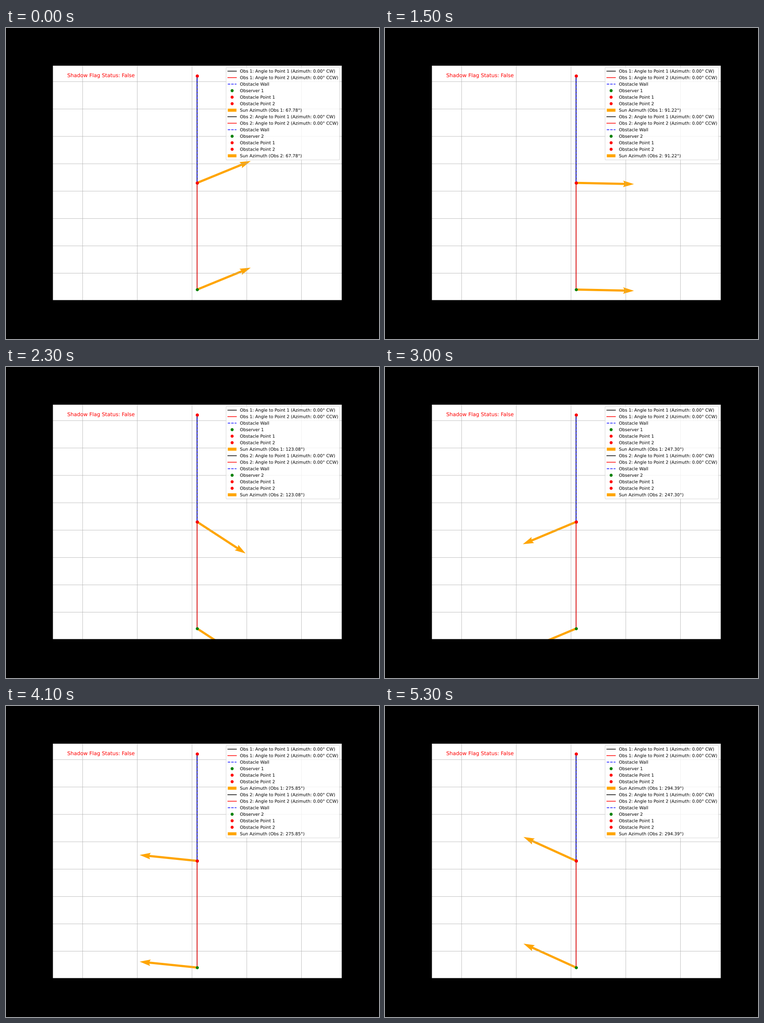
A matplotlib script that plays this animation: 820 px wide and 683 px high, repeating every 5.4 s.

```python
import math

import matplotlib.pyplot as plt
from matplotlib.animation import FuncAnimation
from matplotlib.patches import FancyBboxPatch, Rectangle
from matplotlib.patheffects import Normal

WIDTH, HEIGHT = 820, 683
FRAMES, INTERVAL = 54, 100

# All positions are in a virtual canvas of 1200 x 1000 with y pointing down
CANVAS_W, CANVAS_H = 1200, 1000
DPI = WIDTH / 12
LEFT, RIGHT, TOP, BOTTOM = 150.5, 1080.5, 120.5, 875.5
GRID_X = [246.5 + 176 * i for i in range(5)]
GRID_Y = [172.5 + 88 * i for i in range(8)]

# The wall runs from POINT_1 to POINT_2; one observer at its foot, one below
POINT_1, POINT_2 = (615, 154), (615, 498)
OBSERVERS = [POINT_2, (615, 841)]

# Legend metrics
EM = 1000 / 72
ROW = 14 + EM / 2
BOX = (708.1, 126.9, 365, 297.4)
HANDLE_X, HANDLE_W, HANDLE_H = 713.6, 2 * EM, 0.7 * EM
LABEL_X, BASELINE = 752.5, 143.5

# Sun model, in degrees; one frame is a quarter of an hour
LATITUDE = math.radians(28.455)
DECLINATION, DECLINATION_DRIFT = 21.5417, -0.00144
NOON, HOUR_STEP = 25.8555, 3.75


def sun_azimuth(frame):
    """Azimuth clockwise from north, in degrees."""
    since_noon = frame - NOON
    hour = math.radians(HOUR_STEP * since_noon)
    decl = math.radians(DECLINATION + DECLINATION_DRIFT * since_noon)
    south = math.cos(hour) * math.sin(LATITUDE) - math.tan(decl) * math.cos(LATITUDE)
    return 180 + math.degrees(math.atan2(math.sin(hour), south))


def connect(start, end, style, **kwargs):
    ax.plot([start[0], end[0]], [start[1], end[1]], style, lw=1.5, **kwargs)


def mark(pos, color):
    ax.plot(pos[0] + 0.5, pos[1] + 0.5, "o", color=color)


def add_observer(pos):
    """Draw sight lines, wall and markers; return the sun arrow."""
    connect(pos, POINT_1, "k-")
    if pos != POINT_2:
        connect(pos, POINT_2, "r-")
    connect(POINT_1, POINT_2, "b--")
    mark(pos, "green")
    mark(POINT_1, "red")
    mark(POINT_2, "red")
    return ax.quiver(*pos, 1, 0, color="orange", scale=5)


def add_legend():
    """Draw the legend; return the two labels that show the azimuth."""
    x, y, w, h = BOX
    ax.add_patch(FancyBboxPatch(
        (x, y), w, h, boxstyle=f"round,pad=0,rounding_size={0.2 * EM}",
        fc="white", ec="0.8", lw=1, alpha=0.8, zorder=5))
    sun_labels = []
    baseline = BASELINE
    for n in (1, 2):
        rows = [("k-", f"Obs {n}: Angle to Point 1 (Azimuth: 0.00° CW)"),
                ("r-", f"Obs {n}: Angle to Point 2 (Azimuth: 0.00° CCW)"),
                ("b--", "Obstacle Wall"),
                ("go", f"Observer {n}"),
                ("ro", "Obstacle Point 1"),
                ("ro", "Obstacle Point 2"),
                ("sun", "")]
        for style, label in rows:
            middle = baseline - HANDLE_H / 2
            if style == "sun":
                ax.add_patch(Rectangle((HANDLE_X, baseline - HANDLE_H), HANDLE_W,
                                       HANDLE_H, fc="orange", lw=0, zorder=6))
            elif style.endswith("o"):
                ax.plot(HANDLE_X + HANDLE_W / 2, middle, style, zorder=6)
            else:
                connect((HANDLE_X, middle), (HANDLE_X + HANDLE_W, middle),
                        style, zorder=6)
            text = ax.text(LABEL_X, baseline, label, fontsize=10, zorder=6)
            if style == "sun":
                sun_labels.append(text)
            baseline += ROW
    return sun_labels


# Outlined text and unsnapped paths keep sub-pixel positions
plt.rcParams.update({"font.family": "DejaVu Sans", "path.snap": False,
                     "path.effects": [Normal()]})

# The tiny margin keeps the pixel size from being truncated
fig = plt.figure(figsize=((WIDTH + 1e-6) / DPI, (HEIGHT + 1e-6) / DPI),
                 dpi=DPI, facecolor="black")
ax = fig.add_axes([LEFT / CANVAS_W, 1 - BOTTOM / CANVAS_H,
                   (RIGHT - LEFT) / CANVAS_W, (BOTTOM - TOP) / CANVAS_H])
ax.set_xlim(LEFT, RIGHT)
ax.set_ylim(BOTTOM, TOP)
ax.set_autoscale_on(False)
ax.set_xticks(GRID_X)
ax.set_yticks(GRID_Y)
ax.tick_params(length=0, labelbottom=False, labelleft=False)
ax.grid(True)

arrows = [add_observer(pos) for pos in OBSERVERS]
ax.text(197, 158, "Shadow Flag Status: False", fontsize=12, color="red")
sun_labels = add_legend()


def update(frame):
    azimuth = sun_azimuth(frame)
    angle = math.radians(azimuth)
    for n, (arrow, label) in enumerate(zip(arrows, sun_labels), 1):
        arrow.set_UVC([math.sin(angle)], [math.cos(angle)])
        label.set_text(f"Sun Azimuth (Obs {n}: {azimuth:.2f}°)")
    return [*arrows, *sun_labels]


anim = FuncAnimation(fig, update, frames=FRAMES, interval=INTERVAL,
                     repeat=True, repeat_delay=0, blit=False)
plt.show()
```
